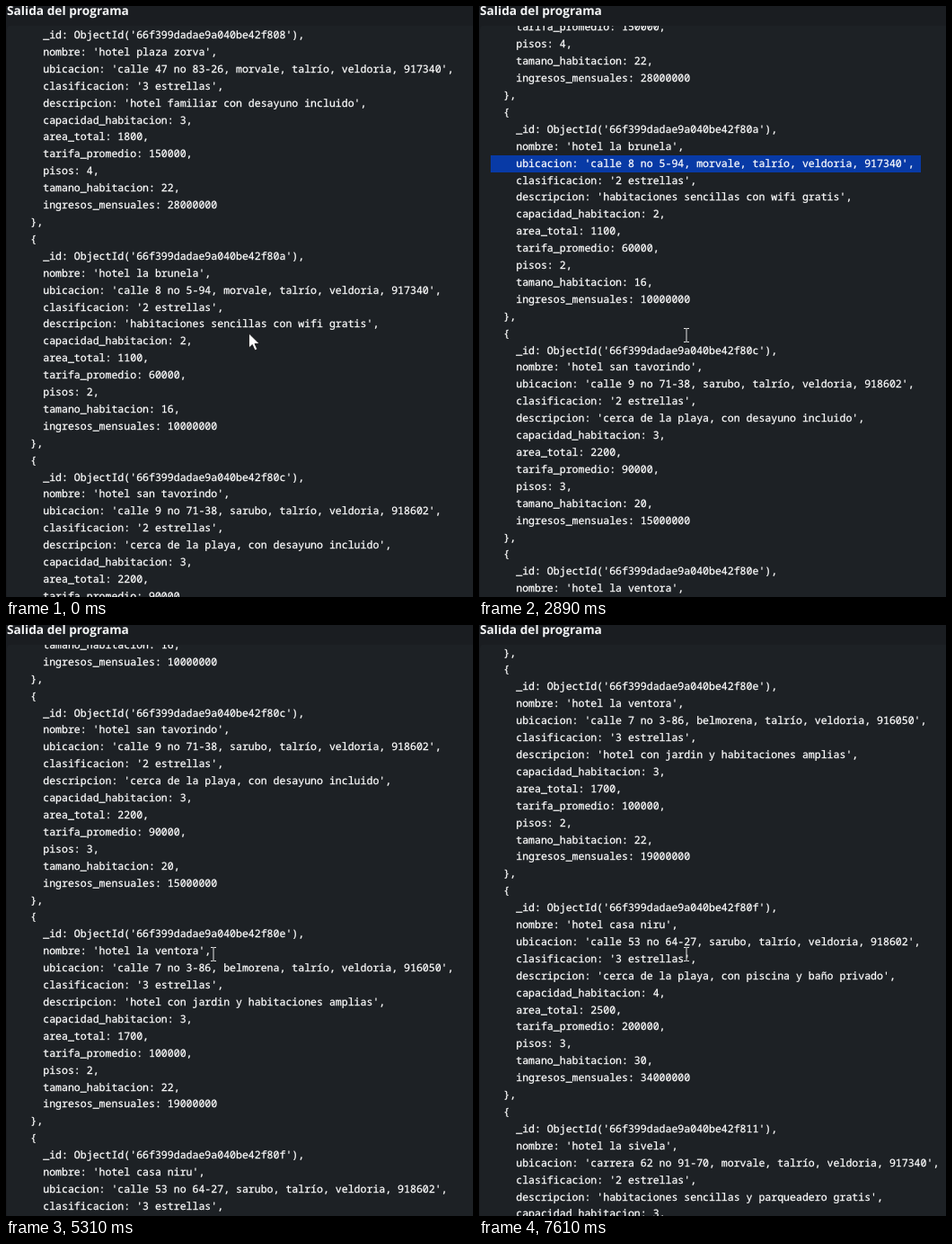
Recreate the animation shown at these times as an HTML page. Size 520 px wide and 657 px high, loop 8000 ms.

```html
<!DOCTYPE html>
<html lang="es">
<head>
<meta charset="utf-8">
<title>Salida del programa</title>
<style>
  html, body { margin: 0; width: 100%; height: 100%; overflow: hidden; background: #1a1d21; }
  body { position: relative; color: #fff; text-rendering: geometricPrecision; }
  body *, pre { position: absolute; margin: 0; white-space: pre; }
  h1 { left: 1px; top: -4px; font: 700 13.7px/20px "Open Sans", sans-serif; color: #f4f5f6; }
  #panel { left: 1px; top: 22px; width: 530px; height: 650px; overflow: hidden; border-radius: 4px; background: #1d2125; }
  #scroll { left: 12px; top: 1px; }
  #code { left: .5px; top: 1px; font: 500 11.55px/18.9px "Noto Sans Mono", monospace; -webkit-text-stroke: .25px #fff; }
  #selection { top: 283.5px; width: 479px; height: 19px; background: #083aa6; }
  #badge { left: 239px; top: 332px; width: 21px; height: 21px; border-radius: 2px; background: #14b391; }
  #popup { left: 265px; bottom: 286px; width: 270px; height: 119px; overflow: hidden; border-radius: 8px; background: #181c39; }
  .button { left: 9px; height: 34px; border-radius: 7px; background: #ff6c6c; font: 500 12px/34px Inter, sans-serif; text-indent: 28px; }
  .button i { left: 10px; top: 11px; width: 12px; height: 12px; border-radius: 50%; background: #fff; }
  .action { bottom: 8px; font: 10.4px/18px "Open Sans", sans-serif; color: #f0f0f5; }
  .rule { bottom: 9px; width: 1px; height: 15px; background: #3c4059; }
  svg { left: 0; top: 0; overflow: visible; }
</style>
</head>
<body>
<h1>Salida del programa</h1>
<div id="panel"><div id="scroll"><div id="selection"></div><pre id="code"></pre></div></div>
<div id="badge"></div>
<div id="popup">
  <div class="button" style="top:9px;width:112px"><i></i>Explore more</div>
  <div class="button" style="top:47px;width:90px"><i></i>Translate</div>
  <span class="action" style="left:18px">Buscar</span><b class="rule" style="left:68px"></b>
  <span class="action" style="left:86px">Copiar</span><b class="rule" style="left:136px"></b>
  <span class="action" style="left:149px">Captura de pantalla</span>
</div>
<svg width="1" height="1">
  <path id="arrow" d="M-1 0v16l3.8-3.5 2.8 6.3 2.7-1.2-2.8-6.1h5.2z" fill="#fff" stroke="#111" stroke-width=".8"/>
  <path id="ibeam" d="M-3-7.5h2.5l.5.5.5-.5h2.5M0-7V7M-3 7.5h2.5l.5-.5.5.5h2.5" fill="none" stroke="#e4e4e4"/>
</svg>
<script>
const LOOP = 8000;
const $ = id => document.getElementById(id);

const hotels = [
  ['808', 'plaza zorva', 'calle 47 no 83-26, morvale', 917340, 3, 'hotel familiar con desayuno incluido', 3, 1800, 150000, 4, 22, 28],
  ['80a', 'la brunela', 'calle 8 no 5-94, morvale', 917340, 2, 'habitaciones sencillas con wifi gratis', 2, 1100, 60000, 2, 16, 10],
  ['80c', 'san tavorindo', 'calle 9 no 71-38, sarubo', 918602, 2, 'cerca de la playa, con desayuno incluido', 3, 2200, 90000, 3, 20, 15],
  ['80e', 'la ventora', 'calle 7 no 3-86, belmorena', 916050, 3, 'hotel con jardin y habitaciones amplias', 3, 1700, 100000, 2, 22, 19],
  ['80f', 'casa niru', 'calle 53 no 64-27, sarubo', 918602, 3, 'cerca de la playa, con piscina y baño privado', 4, 2500, 200000, 3, 30, 34],
  ['811', 'la sivela', 'carrera 62 no 91-70, morvale', 917340, 2, 'habitaciones sencillas y parqueadero gratis', 3, 1300, 80000, 2, 18, 12]
];

$('code').textContent = hotels.map(([id, name, street, zip, stars, about, beds, area, rate, floors, size, income]) =>
`    _id: ObjectId('66f399dadae9a040be42f${id}'),
    nombre: 'hotel ${name}',
    ubicacion: '${street}, talrío, veldoria, ${zip}',
    clasificacion: '${stars} estrellas',
    descripcion: '${about}',
    capacidad_habitacion: ${beds},
    area_total: ${area},
    tarifa_promedio: ${rate},
    pisos: ${floors},
    tamano_habitacion: ${size},
    ingresos_mensuales: ${income}000000
  },
`).join('  {\n');

// Each move: first step, last step, number of steps, target values
const scrolls = [
  [1800, 2520, 9, 132], [2890, 3250, 5, 227], [3980, 4770, 10, 354],
  [5040, 5580, 7, 438], [6180, 6700, 7, 570], [6980, 7610, 8, 701]
];
const pointerMoves = [
  [90, 360, 4, 235.5, 310], [1070, 1160, 2, 234.5, 340], [1340, 1520, 3, 231, 366]
];

const glide = p => 1 - (1 - p) ** 4 * (1 + 4 * p);
const smooth = p => p * (2 - p);

function follow(moves, start, t, ease) {
  let now = start;
  for (const [first, last, steps, ...target] of moves) {
    if (t < first) break;
    // The small lead absorbs uneven spacing between steps
    const step = Math.floor((t - first) / (last - first) * (steps - 1) + .1);
    const p = ease(Math.min(1, (step + .5) / (steps - .5)));
    now = now.map((v, i) => v + (target[i] - v) * p);
  }
  return now;
}

const show = (id, on) => $(id).style.display = on ? '' : 'none';

function draw(t) {
  const [offset] = follow(scrolls, [0], t, glide);
  const [x, y] = follow(pointerMoves, [271.5, 364], t, smooth);
  const isArrow = t < 90 || t >= 1340 && t < 2890;
  $('scroll').style.top = 1 - Math.round(offset) + 'px';
  show('selection', t >= 800 && t < 3530);
  show('badge', t >= 1070 && t < 2890);
  show('popup', t >= 980 && t < 1800);
  $('popup').style.height = (t < 1340 ? 35 : 119) + 'px';
  $('popup').style.top = (t < 1340 ? 336 : 252) + 'px';
  show('arrow', isArrow);
  show('ibeam', !isArrow);
  for (const id of ['arrow', 'ibeam']) $(id).setAttribute('transform', `translate(${x} ${y})`);
}

function tick() {
  draw(performance.now() % LOOP);
  requestAnimationFrame(tick);
}
tick();
</script>
</body>
</html>
```
